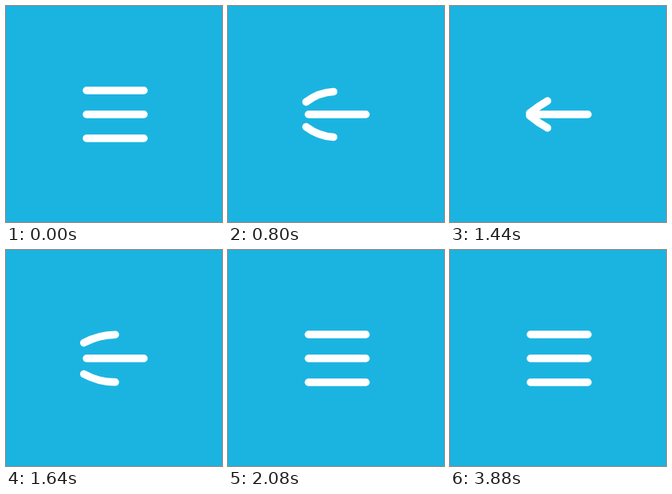
An HTML page that plays this animation: 271x271 px, repeating every 4000 ms.

```html
<!DOCTYPE html>
<html lang="en">
<head>
<meta charset="utf-8">
<title>Menu to arrow</title>
<style>
  html, body { margin: 0; width: 100%; height: 100%; overflow: hidden; background: #1bb4e1; }
  svg { display: block; width: 100%; height: 100%; }
  path { fill: none; stroke: #fff; stroke-width: 9.5; stroke-linecap: round; }
</style>
</head>
<body>
<svg viewBox="0 0 271 271">
  <path id="top"/>
  <path d="M101 136H173"/>
  <path id="bottom" transform="matrix(1 0 0 -1 0 272)"/>
</svg>
<script>
const LOOP = 4000, STEP = 40;

const clamp = x => Math.min(1, Math.max(0, x));
const sine = x => (1 - Math.cos(Math.PI * clamp(x))) / 2;
const smooth = (from, to, x) => {
  const u = clamp((x - from) / (to - from));
  return u * u * (3 - 2 * u);
};

// 0 = menu, 1 = arrow
const progress = t => sine((t - 280) / 880) - sine((t - 1280) / 800);

// Upper stroke: shortens, then its left end drops, then its right end follows
function stroke(q) {
  const follow = smooth(.55, 1, q);
  const left = 101 - 3.4 * Math.sin(Math.PI * q);
  const right = 173 - 50.7 * smooth(0, .9, q);
  const low = 106 + 30 * smooth(.3, 1, q);
  const high = 106 + 14.8 * follow;
  const bendX = (left + right) / 2 - 1;
  const bendY = high + (low - high) / 2 * follow;
  return `M${left} ${low}Q${bendX} ${bendY} ${right} ${high}`;
}

const strokes = [document.getElementById("top"), document.getElementById("bottom")];
const start = performance.now();

function draw(now) {
  const t = Math.floor(Math.max(0, now - start) % LOOP / STEP) * STEP;
  const d = stroke(progress(t));
  for (const s of strokes) s.setAttribute("d", d);
  requestAnimationFrame(draw);
}
draw(start);
</script>
</body>
</html>
```
